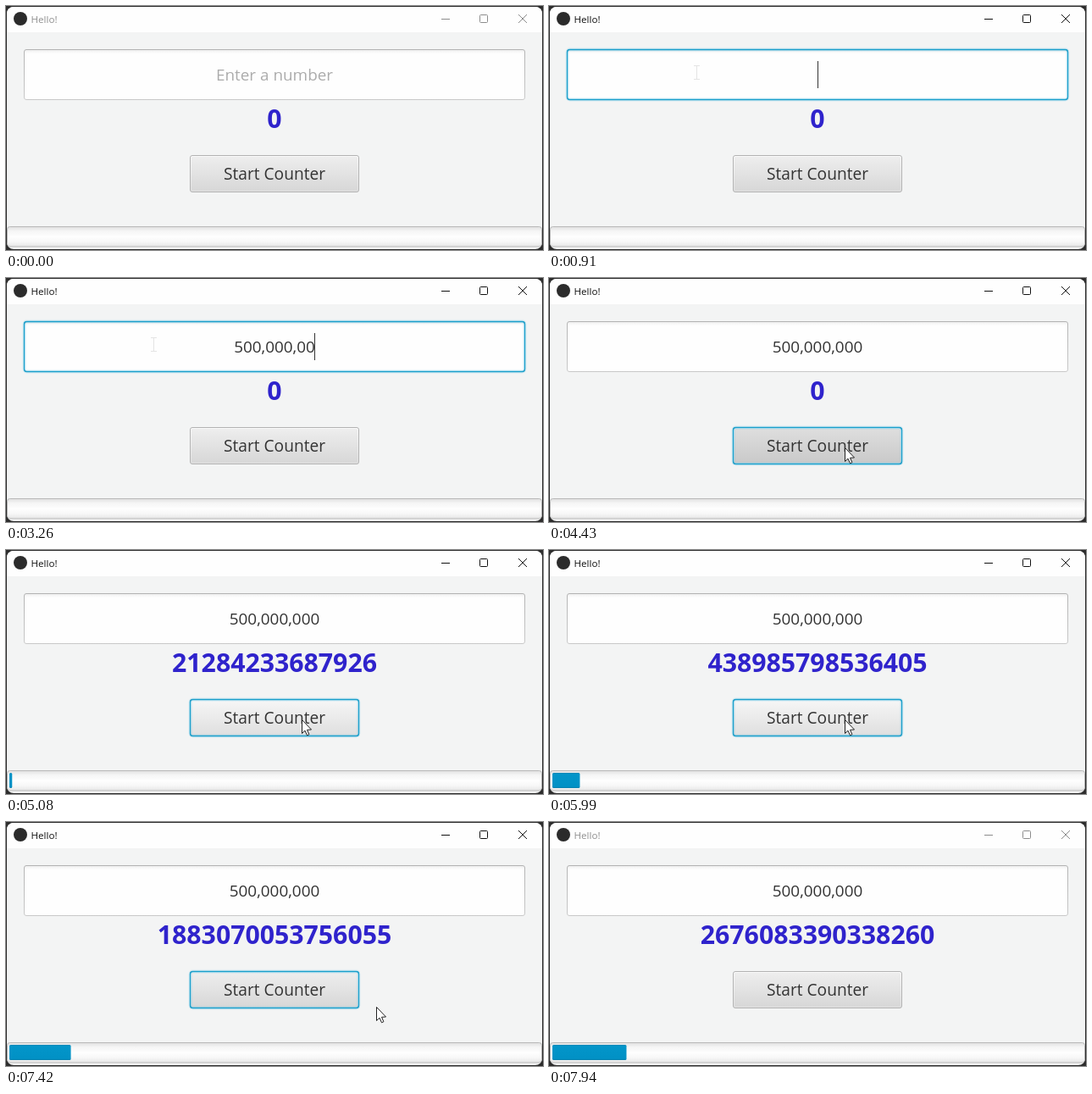
An HTML page with a canvas that plays this animation: 634 by 288 pixels, repeating every 8000 ms.

```html
<!DOCTYPE html>
<html lang="en">
<head>
<meta charset="utf-8">
<title>Counter</title>
<style>
  html, body { margin: 0; width: 634px; height: 288px; overflow: hidden; background: #2d2d2d; }
  canvas { display: block; }
</style>
</head>
<body>
<canvas id="stage" width="634" height="288"></canvas>
<script>
const c = document.getElementById('stage').getContext('2d');
const LOOP = 8000, FOCUS = 780, CLICK = 4430, BLUR = 7810;
const ENTRY = '500,000,000';
const KEYS = [1440, 1700, 1830, 2220, 2350, 2480, 2610, 2870, 3000, 3130, 3390];
// time, number of terms summed so far
const TERMS = [[4690, 0], [4820, 900000], [5080, 6524451], [5990, 29630585],
               [6900, 49579266], [7940, 73158504]];
// time, x, y
const MOUSE = [[3650, 174, 78], [4040, 312, 211], [4300, 349, 200], [6510, 349, 200],
               [6770, 436, 193], [7290, 436, 193], [7680, 440, 290]];

const snap = t => t < 1440 ? Math.min(1300, Math.floor(t / 130) * 130)
                           : 1440 + Math.floor((t - 1440) / 130) * 130;

// Interpolates rows of [time, ...values]
function track(rows, t, ease = u => u) {
  if (t <= rows[0][0]) return rows[0].slice(1);
  const i = rows.findIndex(r => r[0] >= t);
  if (i < 0) return rows[rows.length - 1].slice(1);
  const a = rows[i - 1], b = rows[i], u = ease((t - a[0]) / (b[0] - a[0]));
  return a.slice(1).map((v, k) => v + (b[k + 1] - v) * u);
}

const smooth = u => u * u * (3 - 2 * u);

function shade(y, h, ...stops) {
  const g = c.createLinearGradient(0, y, 0, y + h);
  stops.forEach(([at, color]) => g.addColorStop(at, color));
  return g;
}

function box(x, y, w, h, r, fill, stroke, width = 1) {
  c.beginPath();
  c.roundRect(x, y, w, h, r);
  if (fill) { c.fillStyle = fill; c.fill(); }
  if (stroke) { c.strokeStyle = stroke; c.lineWidth = width; c.stroke(); }
}

function ring(x, y, w, h) {
  box(x, y, w, h, 3, null, 'rgba(3,158,211,.14)', 4);
  box(x, y, w, h, 3, null, '#1a9fcb', 1.4);
}

function text(s, x, y, size, color, align = 'center', weight = 400) {
  c.font = `${weight} ${size}px "Open Sans", "Noto Sans", sans-serif`;
  c.textAlign = align;
  c.fillStyle = color;
  c.fillText(s, x, y);
  return c.measureText(s).width;
}

function lines(color, width, ...paths) {
  c.strokeStyle = color;
  c.lineWidth = width;
  c.beginPath();
  for (const [x, y, ...rest] of paths) {
    c.moveTo(x, y);
    for (let i = 0; i < rest.length; i += 2) c.lineTo(rest[i], rest[i + 1]);
  }
  c.stroke();
}

function titleBar(active) {
  c.fillStyle = '#fefefe';
  c.fillRect(0, 0, 634, 31);
  c.fillStyle = '#2b2b2b';
  c.beginPath();
  c.arc(17, 15, 8, 0, 7);
  c.fill();
  text('Hello!', 29.5, 20, 11.6, active ? '#111' : '#8f8f8f', 'left');
  const ink = active ? '#111' : '#8c8c8c';
  lines(ink, 1, [514, 15.5, 524, 15.5]);
  box(559.5, 10.5, 9, 9, 1, null, ink);
  lines(ink, 1, [605, 10, 615, 20], [615, 10, 605, 20]);
}

function field(t, focused) {
  box(21.5, 51.5, 591, 59, 2.5,
    shade(52, 58, [0, '#efefef'], [.07, '#fefefe'], [1, '#fefefe']),
    shade(51, 60, [0, '#b3b3b3'], [1, '#c9c9c9']));
  if (focused) ring(21.5, 51.5, 591, 59);
  if (t < FOCUS) {
    text('Enter a number', 317, 88, 18.9, '#acacac');
    return;
  }
  const typed = ENTRY.slice(0, KEYS.filter(k => k <= t).length);
  const w = text(typed, 317, 88, 18.9, '#333');
  const last = Math.max(910, ...KEYS.filter(k => k <= t));
  if (focused && (t - last) % 1000 < 530) {
    const x = Math.floor(317 + w / 2) + .5;
    lines('#333', 1, [x, 65, x, 97]);
  }
}

function button(focused, hover, pressed) {
  const [top, bottom] = pressed ? ['#dedede', '#c9c9c9']
    : hover ? ['#f6f6f6', '#dfdfdf'] : ['#eeeeee', '#d7d7d7'];
  box(217.5, 176.5, 199, 43, 2.5, shade(177, 42, [0, top], [1, bottom]), '#b2b2b2');
  box(218.5, 177.5, 197, 41, 2, null, shade(177, 42, [0, '#fafafa'], [1, '#e2e2e2']));
  if (focused) ring(217.5, 176.5, 199, 43);
  text('Start Counter', 317, 205, 19.15, '#333');
}

function progress(part) {
  box(1.5, 260.5, 631, 23.5, 3,
    shade(261, 23, [0, '#e2e2e2'], [.2, '#f5f5f5'], [.5, '#fefefe'], [.75, '#f7f7f7'], [1, '#e6e6e6']),
    '#b9b9b9');
  const w = 632 * part - 5;
  if (part > 0) box(4, 263, Math.max(2, w), 18, 1.5,
    shade(263, 18, [0, '#0b86b5'], [.1, '#0395c9'], [.9, '#0191c5'], [1, '#0a7fab']));
}

function pointer(t) {
  const [x, y] = track(MOUSE, t, smooth).map(Math.round);
  if (t < FOCUS || y > 288) return;
  if (y < 111) {
    lines('#e4e4e4', 1, [x - 3, y - 7.5, x + 4, y - 7.5], [x + .5, y - 7, x + .5, y + 8],
      [x - 3, y + 8.5, x + 4, y + 8.5]);
    return;
  }
  c.save();
  c.translate(x + .5, y + .5);
  c.beginPath();
  [[0, 0], [0, 16], [3.5, 12.7], [6, 18.3], [8.4, 17.2], [6, 11.8], [11, 11.5]]
    .forEach(p => c.lineTo(...p));
  c.closePath();
  c.fillStyle = '#fff';
  c.fill();
  c.strokeStyle = '#222';
  c.lineWidth = 1;
  c.stroke();
  c.restore();
}

function draw(t) {
  const active = t >= FOCUS && t < BLUR;
  const [x, y] = track(MOUSE, t, smooth);
  const hover = x > 217 && x < 417 && y > 176 && y < 220;
  const n = Math.round(track(TERMS, t)[0]);

  c.fillStyle = '#2d2d2d';
  c.fillRect(0, 0, 634, 288);
  c.save();
  c.beginPath();
  c.roundRect(1, 1, 632, 286, 8);
  c.clip();
  c.fillStyle = '#f3f4f4';
  c.fillRect(0, 0, 634, 288);
  titleBar(active);
  field(t, active && t < CLICK);
  text(String(n * (n + 1) / 2), 317, 144, 30.27, '#2f23cc', 'center', 700);
  button(active && t >= CLICK, hover, t >= CLICK && t < 4560);
  progress(n / 5e8);
  c.restore();
  pointer(t);
}

function frame(now) {
  draw(snap(now % LOOP));
  requestAnimationFrame(frame);
}
requestAnimationFrame(frame);
</script>
</body>
</html>
```
